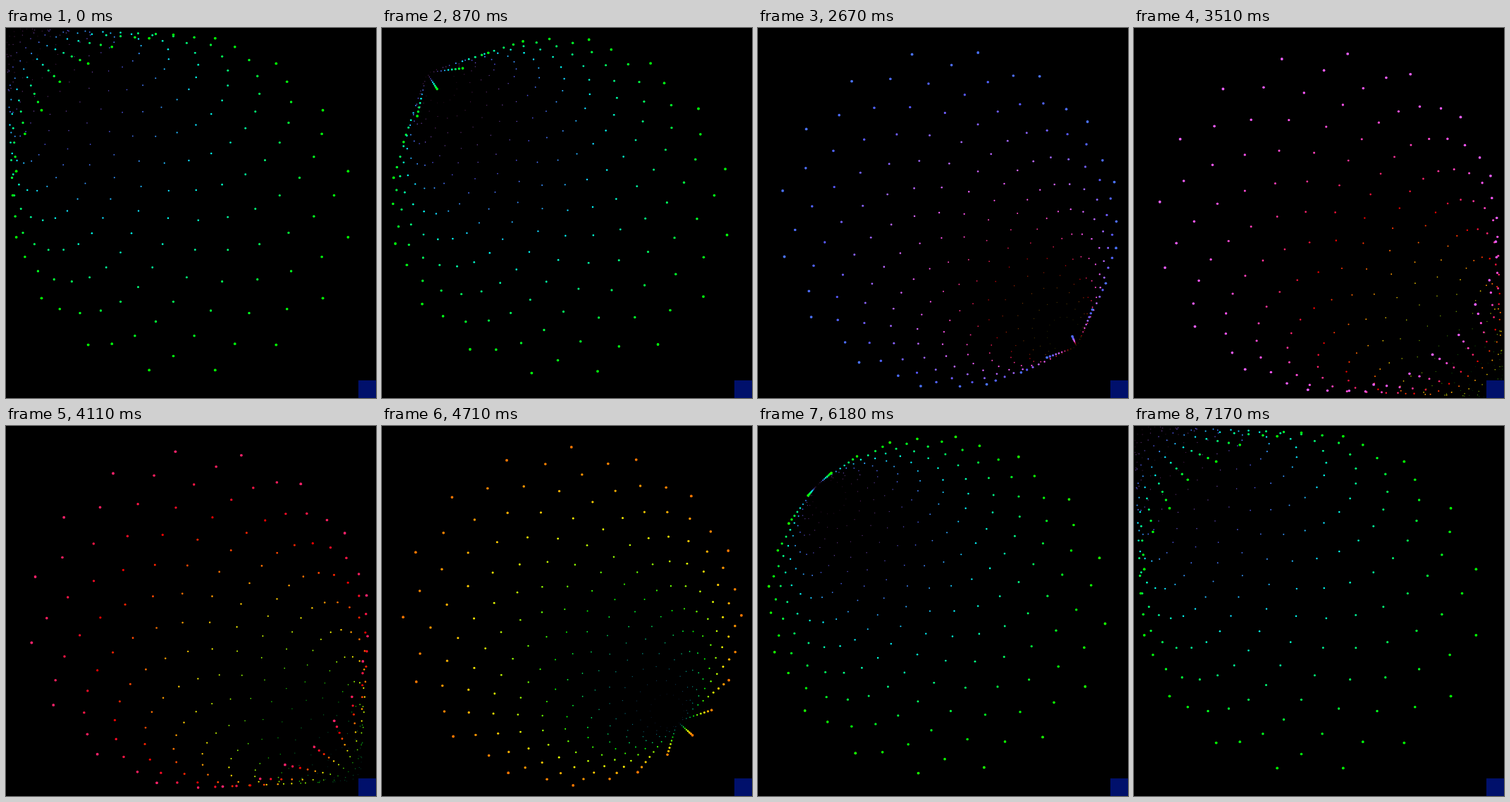
An HTML page with a canvas for the animation above (7200 ms loop, 525 by 525 pixels).

```html
<!DOCTYPE html>
<html>
<head>
<meta charset="utf-8">
<style>
html, body { margin: 0; height: 100%; overflow: hidden; background: #000; }
canvas { display: block; }
</style>
</head>
<body>
<canvas id="stage" width="525" height="525"></canvas>
<script>
const ctx = document.getElementById('stage').getContext('2d');
const STEP = 30, STEPS = 240, RINGS = 20, DOTS = 16, MID = 262.5;
const TAU = 2 * Math.PI;

// The second half turn is one step shorter, so the last step meets the first.
function turnAt(step) {
  const half = STEPS / 2;
  return step < half
    ? Math.PI * step / half
    : Math.PI * (1 + (step - half) / (half - 1));
}

// Diagonal sway from -1 to 1, lingering slightly at both ends.
function swayAt(turn) {
  return -Math.cos(turn - 0.049 * Math.sin(2 * turn));
}

function ringColor(ring, turn) {
  const base = 120 + turn * 360 / TAU - 48 * Math.sin(turn) - 8 * Math.sin(2 * turn);
  const hue = (base + 2.5 * (RINGS - ring) ** 1.5) % 360;
  const glow = Math.max(0, Math.cos((hue - 270) * TAU / 360));
  const alpha = Math.min(1, 0.1 + ring / 9);
  return `hsla(${hue}, 100%, ${50 + 20 * glow}%, ${alpha})`;
}

function drawRing(ring, turn) {
  const center = MID + 12.5 * (RINGS + 1 - ring) * swayAt(turn);
  const radius = 12 * ring;
  const size = 0.3 + 0.08 * ring;
  const start = turn + (ring % 2 ? 0 : Math.PI / DOTS);
  ctx.fillStyle = ringColor(ring, turn);
  for (let i = 0; i < DOTS; i++) {
    const angle = start + i * TAU / DOTS;
    ctx.beginPath();
    ctx.arc(center + radius * Math.cos(angle), center + radius * Math.sin(angle), size, 0, TAU);
    ctx.fill();
  }
}

const origin = performance.now();

function draw() {
  const elapsed = Math.max(0, performance.now() - origin);
  const turn = turnAt(Math.floor(elapsed / STEP) % STEPS);
  ctx.fillStyle = '#000';
  ctx.fillRect(0, 0, 525, 525);
  for (let ring = 2; ring <= RINGS; ring++) drawRing(ring, turn);
  ctx.fillStyle = '#00106b';
  ctx.fillRect(500, 500, 25, 25);
  requestAnimationFrame(draw);
}
draw();
</script>
</body>
</html>
```
